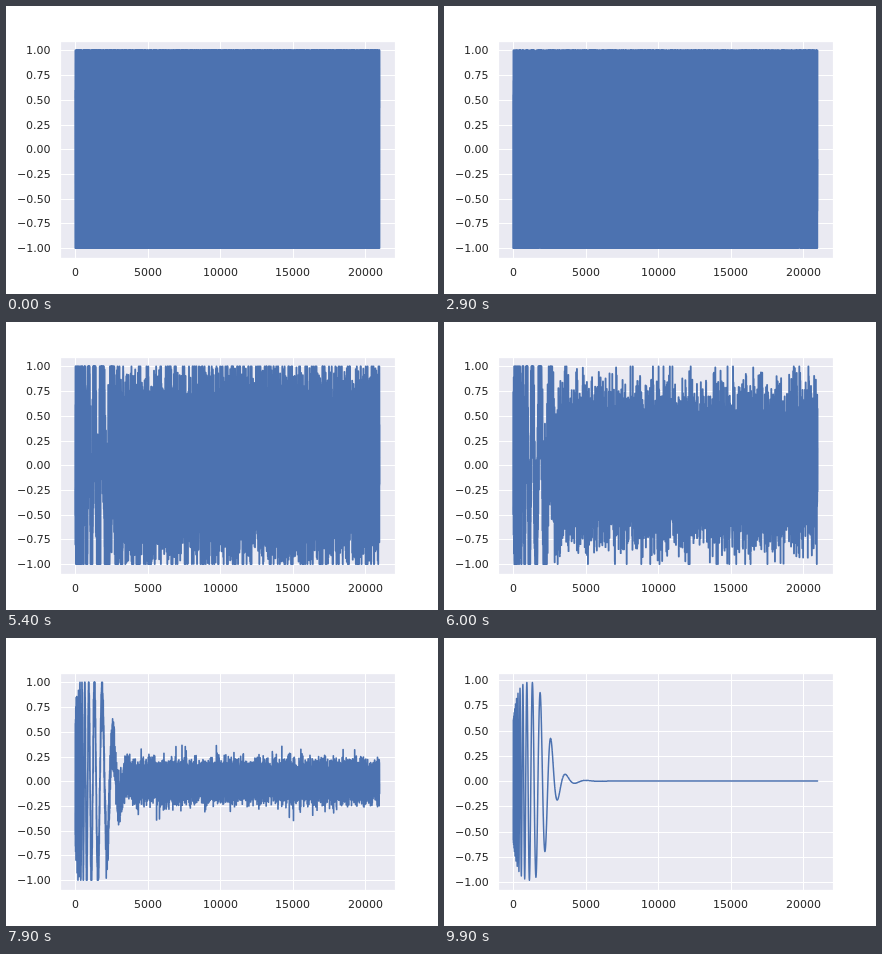
An HTML page for the animation above (10000 ms loop, 432 by 288 pixels).

```html
<!DOCTYPE html>
<html lang="en">
<head>
<meta charset="utf-8">
<title>Denoising a waveform</title>
<style>
html, body { margin: 0; width: 100%; height: 100%; overflow: hidden; background: #fff; }
svg { display: block; }
text { font: 11px "DejaVu Sans", sans-serif; fill: #262626; }
.grid { stroke: #fff; stroke-width: 1; fill: none; }
#wave { stroke: #4c72b0; fill: none; stroke-linecap: round; stroke-linejoin: round; }
</style>
</head>
<body>
<svg width="432" height="288" viewBox="0 0 432 288">
  <rect x="54" y="35" width="335" height="217" fill="#eaeaf2"/>
  <g id="xAxis"></g>
  <g id="yAxis"></g>
  <path id="wave"/>
  <rect x="54.5" y="35.5" width="335" height="217" fill="none" stroke="#fff" stroke-width="1.25"/>
</svg>
<script>
const COUNT = 21000, BUCKET = 12, FRAMES = 100, STEP = 100;
const LEFT = 69.22, SPAN = 304.36, TOP = 34.56, HEIGHT = 217.44;

const xAt = i => LEFT + i / COUNT * SPAN;
const snap = v => Math.floor(v + .5) + .5;
const byId = id => document.getElementById(id);

// Drum hit: a falling chirp under a swelling, then dying envelope (x in pixels).
function drum(x) {
  const swell = 1 - .4 * Math.exp(-x / 4);
  const decay = 1 / (1 + (x / 36) ** 7);
  return .99 * swell * decay * Math.cos(Math.PI * (6 * Math.log(x + .4) - 3.85));
}

function random(seed) {
  return () => {
    seed = seed + 0x6D2B79F5 | 0;
    let t = Math.imul(seed ^ seed >>> 15, 1 | seed);
    t = t + Math.imul(t ^ t >>> 7, 61 | t) ^ t;
    return ((t ^ t >>> 14) >>> 0) / 4294967296;
  };
}

const clean = Float32Array.from({ length: COUNT }, (_, i) => drum(i / COUNT * SPAN));
const data = new Float32Array(COUNT);

// Cosine schedule from pure noise to none.
function noiseLevel(frame) {
  const t = Math.max(0, 98.6 - frame) / 100;
  return (1 - Math.cos(.994 * Math.PI * t)) / 2;
}

function fillData(frame, sigma) {
  const gain = Math.sqrt(1 - sigma * sigma);
  const rand = random(frame * 7919 + 17);
  for (let i = 0; i < COUNT; i++) {
    const noise = Math.sqrt(-2 * Math.log(1 - rand())) * Math.cos(2 * Math.PI * rand());
    data[i] = Math.max(-1, Math.min(1, gain * clean[i] + sigma * noise));
  }
}

function draw(frame) {
  const sigma = noiseLevel(frame);
  fillData(frame, sigma);

  // Keep only the lowest and highest sample of each bucket.
  let low = 1, high = -1;
  const keep = [0];
  for (let start = 0; start < COUNT; start += BUCKET) {
    let min = start, max = start;
    for (let i = start; i < start + BUCKET; i++) {
      if (data[i] < data[min]) min = i;
      if (data[i] > data[max]) max = i;
    }
    keep.push(Math.min(min, max), Math.max(min, max));
    low = Math.min(low, data[min]);
    high = Math.max(high, data[max]);
  }
  keep.push(COUNT - 1);

  const range = high - low;
  const yAt = v => TOP + (high + range * .05 - v) / (range * 1.1) * HEIGHT;
  const wave = byId("wave");
  wave.setAttribute("d",
    "M" + keep.map(i => xAt(i).toFixed(2) + " " + yAt(data[i]).toFixed(2)).join("L"));
  // Crowded noise spikes build up a slightly heavier edge.
  wave.setAttribute("stroke-width", 1.5 + Math.min(.4, 2 * sigma));

  let marks = "";
  for (let v = -1; v <= 1; v += .25) {
    const y = yAt(v), label = v.toFixed(2).replace("-", "\u2212");
    marks += `<path class="grid" d="M54 ${snap(y)}H389"/>` +
      `<text x="${v < 0 ? 11.1 : 20.1}" y="${Math.round(y + 4)}">${label}</text>`;
  }
  byId("yAxis").innerHTML = marks;
}

for (let v = 0; v <= 20000; v += 5000) {
  const x = xAt(v), start = Math.round(x - 3.5 * String(v).length) + .1;
  byId("xAxis").innerHTML += `<path class="grid" d="M${snap(x)} 35V252"/>` +
    `<text x="${start}" y="270">${v}</text>`;
}

let shown = -1;
function tick() {
  const frame = Math.floor(performance.now() / STEP) % FRAMES;
  if (frame !== shown) draw(shown = frame);
  requestAnimationFrame(tick);
}
tick();
</script>
</body>
</html>
```
